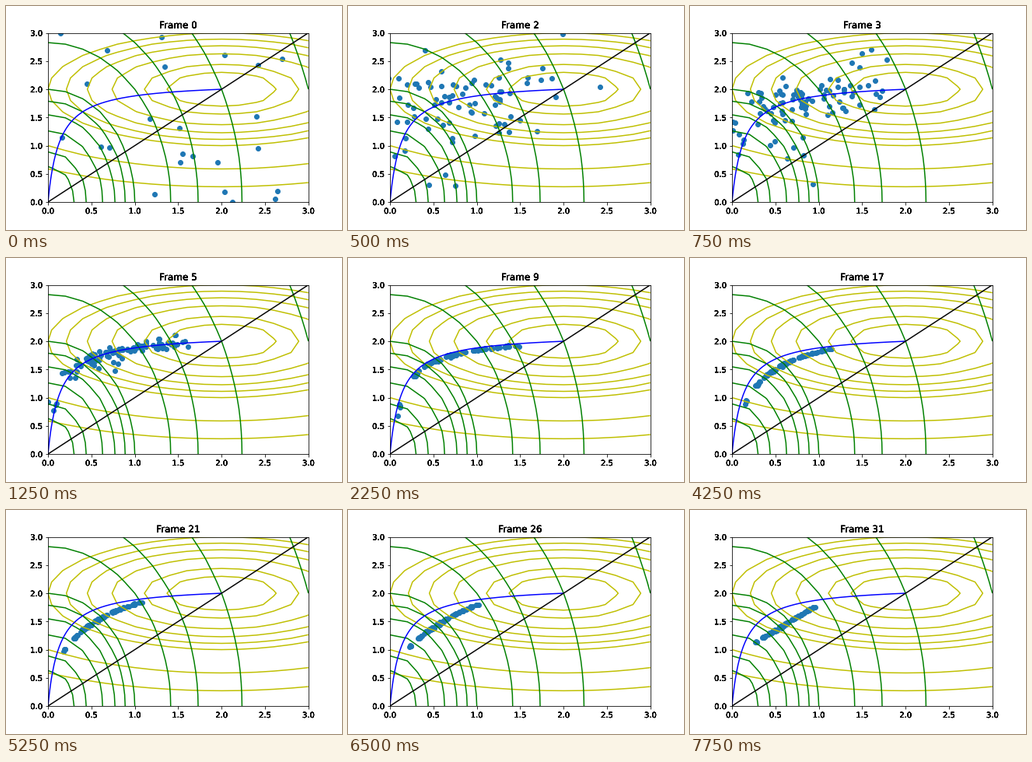
Animation, 432 px wide and 288 px high, one loop 8000 ms. Source, as a matplotlib script:

```python
import matplotlib.pyplot as plt
import numpy as np
from matplotlib.animation import FuncAnimation
from matplotlib.patheffects import Normal

FRAMES, INTERVAL, COUNT = 32, 250, 100

rng = np.random.default_rng(5)

# The first two generations are scattered, denser towards the left in the second.
scattered = [3 * rng.random((24, 2)),
             np.column_stack([2.9 * rng.random(44) ** 1.5, 3 * rng.random(44)])]

# Later ones gather in small groups along a strip.
groups = rng.random(22) ** 1.4
place = rng.choice(groups, COUNT) + rng.normal(0, 0.015, COUNT)
place = (place - place.min()) / np.ptp(place)
stray = rng.standard_t(3, (COUNT, 2))

# Lower end, middle and upper end of the strip at a few generations.
TIMES = [5, 9, 13, 21, 31]
STRIPS = np.array([
    [(0.06, 0.66), (0.40, 1.60), (1.60, 1.97)],
    [(0.09, 0.66), (0.53, 1.66), (1.49, 1.92)],
    [(0.115, 0.79), (0.37, 1.42), (1.22, 1.89)],
    [(0.18, 0.96), (0.50, 1.46), (1.08, 1.84)],
    [(0.27, 1.12), (0.585, 1.43), (0.955, 1.76)]])


def hyperbola(x, ends):
    """Value at x of the curve y = c + d / (x + s) through three points."""
    (x0, y0), (x1, y1), (x2, y2) = ends
    k = (y0 - y1) / (y1 - y2) * (x2 - x1) / (x1 - x0)
    s = (x2 - k * x0) / (k - 1)
    d = (y0 - y1) * (x0 + s) * (x1 + s) / (x1 - x0)
    return y0 + d * (1 / (x + s) - 1 / (x0 + s))


def strip_at(n):
    flat = [np.interp(n, TIMES, v) for v in STRIPS.reshape(len(TIMES), -1).T]
    return np.reshape(flat, (3, 2))


def dots(n):
    if n < 2:
        return scattered[n]
    ends = strip_at(n)
    x = ends[0, 0] + place * (ends[2, 0] - ends[0, 0])
    spread = 0.4 * 0.45 ** (n - 2) + 0.004
    return np.column_stack([x, hyperbola(x, ends)]) + spread * stray


plt.rcParams["font.family"] = "DejaVu Sans"
fig = plt.figure(figsize=(6, 4), dpi=72, facecolor="white")
ax = fig.add_axes([0.125, 0.125, 0.775, 0.755])

grid = np.linspace(0, 3, 16)
X, Y = np.meshgrid(grid, grid)
levels = [0.1, 0.2, 0.4, 0.6, 0.8, 1, 2, 3, 5, 10]
ax.contour(X, Y, (X - 2)**2 / 4 + (Y - 2)**2, levels, colors="y", linewidths=1.5)
ax.contour(X, Y, X**2 + Y**2 / 4, levels, colors="g", linewidths=1.5)

front = np.linspace(0, 2, 200)
ax.plot(front, 32 * front / (15 * front + 2), "b", lw=1.5)
ax.plot([0, 3], [0, 3], "k", lw=1.5)
scatter = ax.scatter([], [], s=36, color="C0", lw=1, zorder=1)

ticks = np.arange(0, 3.1, 0.5)
ax.set(xlim=(0, 3), ylim=(0, 3), xticks=ticks, yticks=ticks)
title = ax.set_title("", fontsize=12)
for text in [title, *ax.get_xticklabels(), *ax.get_yticklabels()]:
    text.set_path_effects([Normal()] * 6)  # hard, heavy glyph edges


def draw(n):
    scatter.set_offsets(dots(n))
    title.set_text(f"Frame {n}")
    return scatter, title


anim = FuncAnimation(fig, draw, frames=FRAMES, interval=INTERVAL,
                     repeat=True, repeat_delay=0)
plt.show()
```
